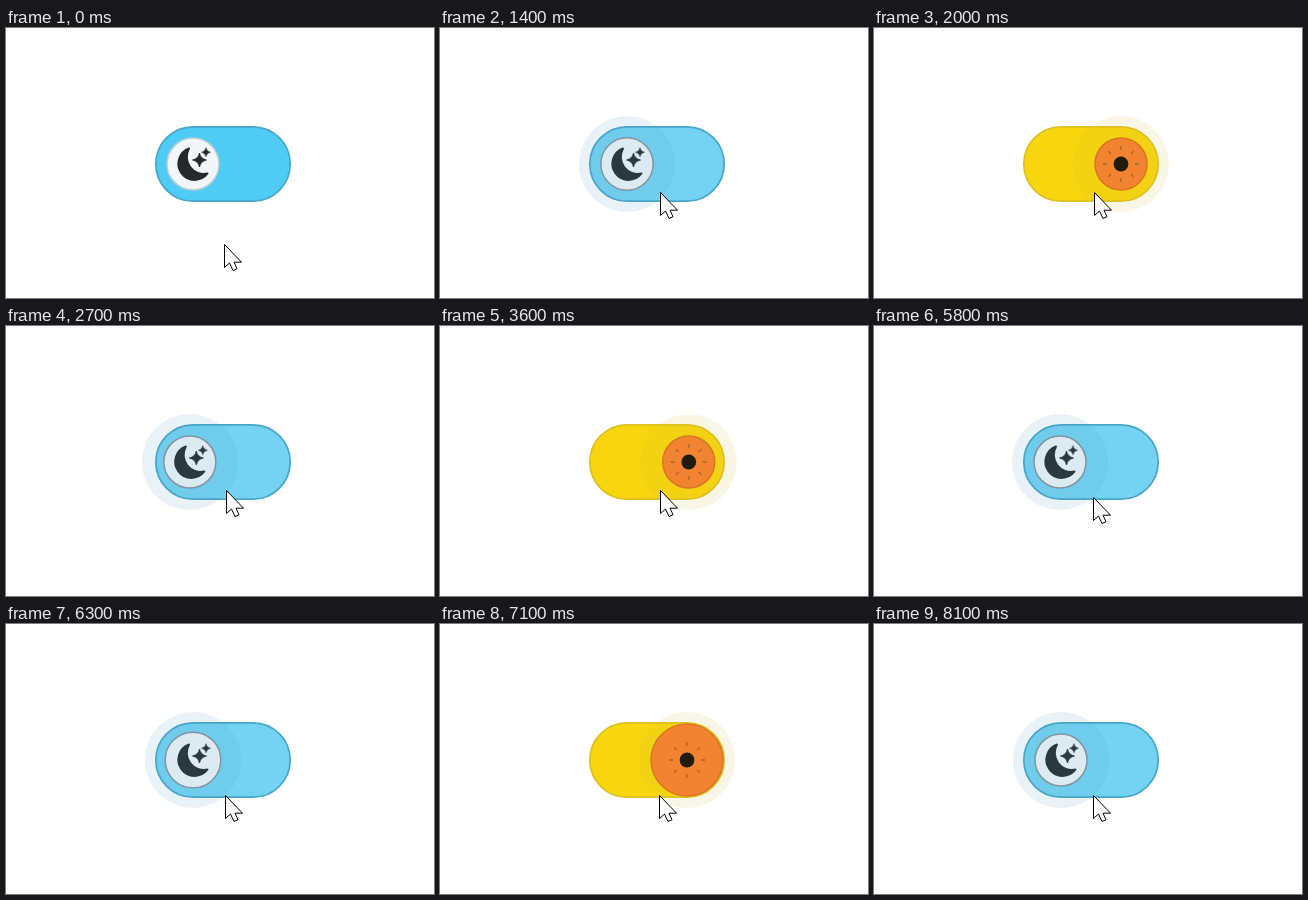
Recreate the animation shown at these times as an HTML page with a canvas. Size 428 by 270 pixels, loop 8200 ms.

```html
<!DOCTYPE html>
<html>
<head>
<meta charset="utf-8">
<style>
html, body { margin: 0; width: 100%; height: 100%; overflow: hidden; background: #fff; }
canvas { display: block; }
</style>
</head>
<body>
<canvas></canvas>
<script>
const W = 428, H = 270, LOOP = 8200;
const canvas = document.querySelector('canvas');
const ctx = canvas.getContext('2d');
const dpr = window.devicePixelRatio || 1;
canvas.width = W * dpr;
canvas.height = H * dpr;
canvas.style.width = W + 'px';
canvas.style.height = H + 'px';

// Release times of the clicks; each one flips the switch.
const flips = [1550, 2574, 3440, 5628, 6440, 7180];
const hovers = [1110, 3860, 5080];
const PRESS = 150, SLIDE = 200;
// time, x, y of the pointer tip
const path = [
  [0, 218, 216], [900, 218, 200], [1200, 220, 164], [3750, 220, 164],
  [4200, 218, 208], [4600, 218, 208], [4900, 218, 188], [5150, 219, 171], [LOOP, 219, 171]
];

const night = {
  track: [78, 204, 245], trackHover: [116, 211, 242], edge: [72, 166, 200],
  knob: [243, 246, 249], rim: [190, 204, 214], rimHover: [136, 147, 156], halo: [78, 155, 193]
};
const day = {
  track: [247, 213, 16], trackHover: [247, 214, 15], edge: [220, 193, 32],
  knob: [246, 124, 48], rim: [232, 146, 58], rimHover: [218, 108, 28], halo: [215, 185, 60]
};

const moon = new Path2D('M-4-15.5A16.2 16.2 0 1 0 14.5 9.5A17 17 0 0 1-4-15.5Z');
const star = new Path2D('M0-7Q1.2-1.2 7 0Q1.2 1.2 0 7Q-1.2 1.2-7 0Q-1.2-1.2 0-7Z');
const arrow = new Path2D('M.5 .5V23.5L5.5 19L9 26.5L13 24.7L10 18.2H17.5Z');

const clamp = v => Math.max(0, Math.min(1, v));
const lerp = (a, b, k) => a + (b - a) * k;
const mix = (a, b, k) => a.map((v, i) => lerp(v, b[i], k));
const rgb = (c, a = 1) => `rgba(${c.map(Math.round)},${a})`;

function outBack(p) {
  const q = p - 1;
  return 1 + 2.2 * q ** 3 + 1.2 * q * q;
}

// 0..1 state that alternates at each listed time
function toggle(times, t, duration, ease = p => p) {
  const n = times.filter(s => s <= t).length;
  if (!n) return 0;
  const k = ease(clamp((t - times[n - 1]) / duration));
  return n % 2 ? k : 1 - k;
}

function pressAmount(t) {
  return Math.max(...flips.map(f =>
    t < f ? clamp((t - f + PRESS) / 60) : 1 - clamp((t - f) / 100)));
}

function pointer(t) {
  const i = path.findIndex(p => p[0] > t);
  const [a, b] = [path[i - 1], path[i]];
  const k = (t - a[0]) / (b[0] - a[0]);
  return [lerp(a[1], b[1], k), lerp(a[2], b[2], k)];
}

function disc(x, y, r, fill) {
  ctx.beginPath();
  ctx.arc(x, y, r, 0, 7);
  ctx.fillStyle = fill;
  ctx.fill();
}

function drawStar(x, y, size) {
  ctx.save();
  ctx.translate(x, y);
  ctx.scale(size, size);
  ctx.fill(star);
  ctx.stroke(star);
  ctx.restore();
}

function drawMoon() {
  ctx.fillStyle = ctx.strokeStyle = '#25292d';
  ctx.lineJoin = 'round';
  ctx.lineWidth = 2;
  ctx.fill(moon);
  ctx.stroke(moon);
  ctx.lineWidth = 0.8;
  drawStar(6.5, -4, 1);
  drawStar(13, -11.8, 0.65);
}

function drawSun() {
  disc(0, 0, 7.4, '#050505');
  ctx.strokeStyle = '#a9521c';
  ctx.lineWidth = 1.3;
  ctx.beginPath();
  for (let i = 0; i < 8; i++) {
    const c = Math.cos(i * Math.PI / 4), s = Math.sin(i * Math.PI / 4);
    ctx.moveTo(c * 14, s * 14);
    ctx.lineTo(c * 18, s * 18);
  }
  ctx.stroke();
}

function draw(t) {
  const hover = toggle(hovers, t, 150);
  const tone = toggle(flips, t, 110);
  const x = lerp(187, 247, toggle(flips, t, SLIDE, outBack));
  const color = name => mix(night[name], day[name], tone);

  ctx.setTransform(dpr, 0, 0, dpr, 0, 0);
  ctx.fillStyle = '#fff';
  ctx.fillRect(0, 0, W, H);

  ctx.beginPath();
  ctx.roundRect(149.8, 98.8, 134.4, 74.4, 37.2);
  ctx.fillStyle = rgb(mix(color('track'), color('trackHover'), hover));
  ctx.fill();
  ctx.strokeStyle = rgb(color('edge'));
  ctx.lineWidth = 1.7;
  ctx.stroke();

  disc(x, 136, lerp(26, 36, pressAmount(t)), rgb(color('knob')));
  ctx.strokeStyle = rgb(mix(color('rim'), color('rimHover'), hover));
  ctx.lineWidth = 1.5;
  ctx.stroke();

  ctx.save();
  ctx.translate(x, 136);
  ctx.globalAlpha = 1 - tone;
  drawMoon();
  ctx.globalAlpha = tone;
  drawSun();
  ctx.restore();

  disc(x, 136, 48, rgb(color('halo'), 0.13 * hover));

  ctx.translate(...pointer(t).map(Math.round));
  ctx.fillStyle = '#fff';
  ctx.strokeStyle = '#000';
  ctx.lineJoin = 'miter';
  ctx.lineWidth = 1;
  ctx.fill(arrow);
  ctx.stroke(arrow);
}

const start = performance.now();
function tick() {
  draw((performance.now() - start) % LOOP);
  requestAnimationFrame(tick);
}
tick();
</script>
</body>
</html>
```
